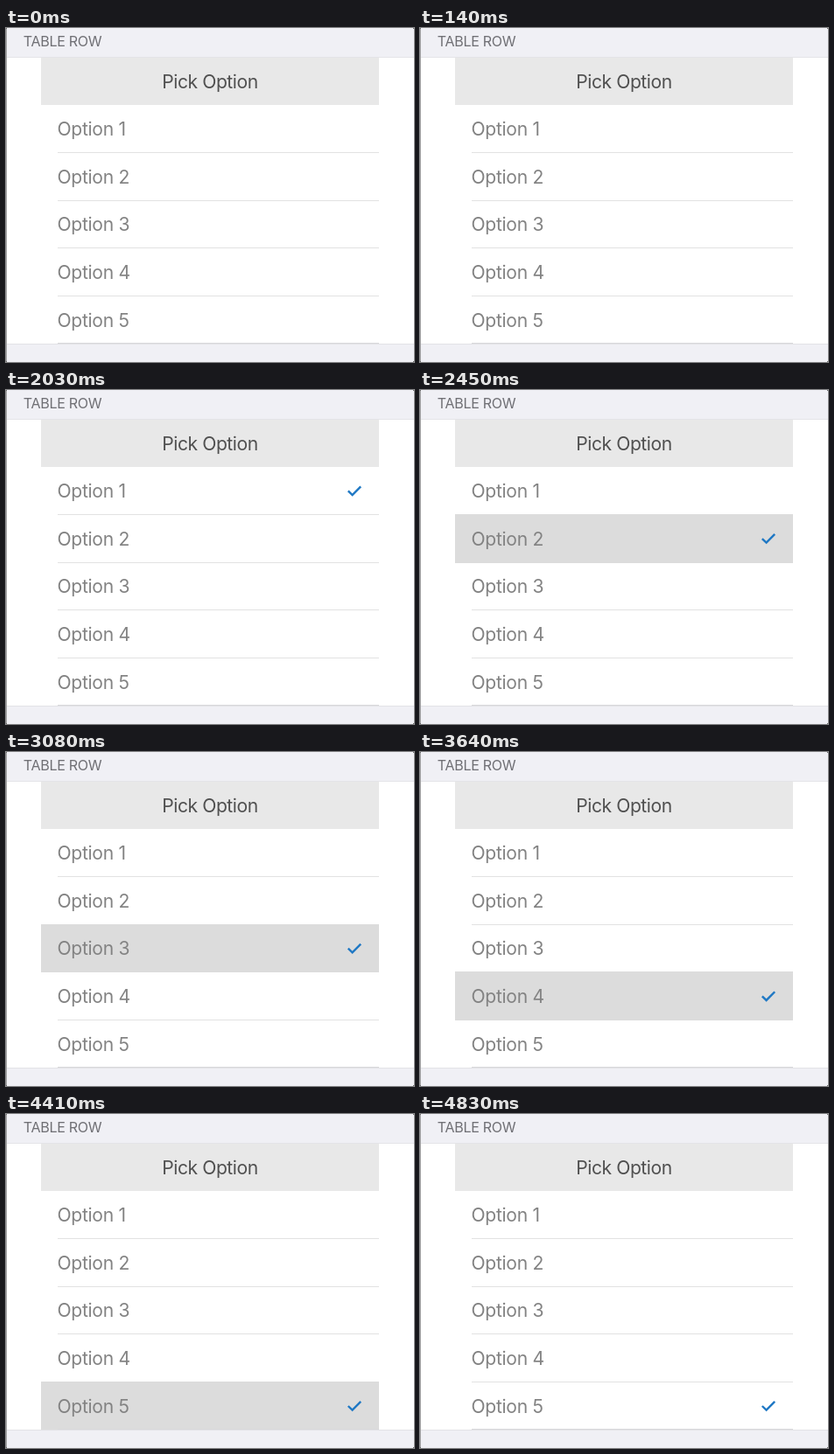
These frames come from a looping animation (466 by 382 pixels, 5.81 s). An HTML page with a canvas:

```html
<!DOCTYPE html>
<html lang="en">
<head>
<meta charset="utf-8">
<style>
html, body { margin: 0; width: 100%; height: 100%; overflow: hidden; background: #fff; }
canvas { display: block; }
</style>
</head>
<body>
<canvas id="stage" width="466" height="382"></canvas>
<script>
const ctx = document.getElementById('stage').getContext('2d');
const LOOP = 5810, STEP = 70;
const LEFT = 40, RIGHT = 426, TOP = 88, PITCH = 54.65;

// When each row is pressed, when its highlight starts to fade, when it is gone
const taps = [
  [1610, 1680, 2030],
  [2450, 2450, 2800],
  [3080, 3080, 3430],
  [3640, 3710, 4130],
  [4410, 4410, 4830],
];

const lineY = i => Math.floor(TOP + i * PITCH);
const ease = p => p * p * (3 - 2 * p);

function rect(color, x, y, w, h) {
  ctx.fillStyle = color;
  ctx.fillRect(x, y, w, h);
}

function text(label, x, y, color, size, spacing, align = 'left') {
  ctx.font = `${size}px Inter, Roboto, sans-serif`;
  ctx.letterSpacing = `${spacing * size}px`;
  ctx.textAlign = align;
  ctx.fillStyle = color;
  ctx.fillText(label, x, y);
}

function check(y) {
  ctx.strokeStyle = '#1f78c4';
  ctx.lineWidth = 2.4;
  ctx.beginPath();
  ctx.moveTo(390.8, y + 0.1);
  ctx.lineTo(395.6, y + 4.7);
  ctx.lineTo(405.2, y - 5);
  ctx.stroke();
}

function draw(t) {
  rect('#fff', 0, 0, 466, 382);
  rect('#f0f0f5', 0, 0, 466, 34);
  rect('#e4e4e8', 0, 33, 466, 1);
  rect('#e8e8e8', LEFT, 34, RIGHT - LEFT, TOP - 34);
  text('TABLE ROW', 19.8, 20.8, '#6f6f74', 16.1, -0.02);
  text('Pick Option', 233, 69, '#505050', 21.1, -0.021, 'center');

  for (let i = 1; i < 5; i++) rect('#e2e2e2', 59, lineY(i), RIGHT - 59, 1);

  const current = taps.findLastIndex(([down]) => t >= down);
  if (current >= 0) {
    const [, fade, end] = taps[current];
    const p = Math.min(1, Math.max(0, (t - fade) / (end - fade)));
    const y = lineY(current);
    ctx.globalAlpha = 1 - ease(p);
    rect('#dcdcdc', LEFT, y, RIGHT - LEFT, lineY(current + 1) - y + 1);
    ctx.globalAlpha = 1;
    check(115.3 + current * PITCH);
  }
  for (let i = 0; i < 5; i++) {
    text(`Option ${i + 1}`, 58.5, 123 + i * PITCH, '#838383', 21.1, -0.014);
  }

  rect('#f0f0f5', 0, 361, 466, 21);
  rect('#e2e2e6', 0, 361, 466, 1);
  rect('#d8d8da', 59, 360, RIGHT - 59, 1);
  rect('#a0a0a2', 0, 0, 1, 382);
  for (const x of [0, 465]) for (const y of [0, 381]) rect('#666', x, y, 1, 1);
}

function frame(now) {
  draw(Math.floor((now % LOOP) / STEP) * STEP);
  requestAnimationFrame(frame);
}
requestAnimationFrame(frame);
</script>
</body>
</html>
```
